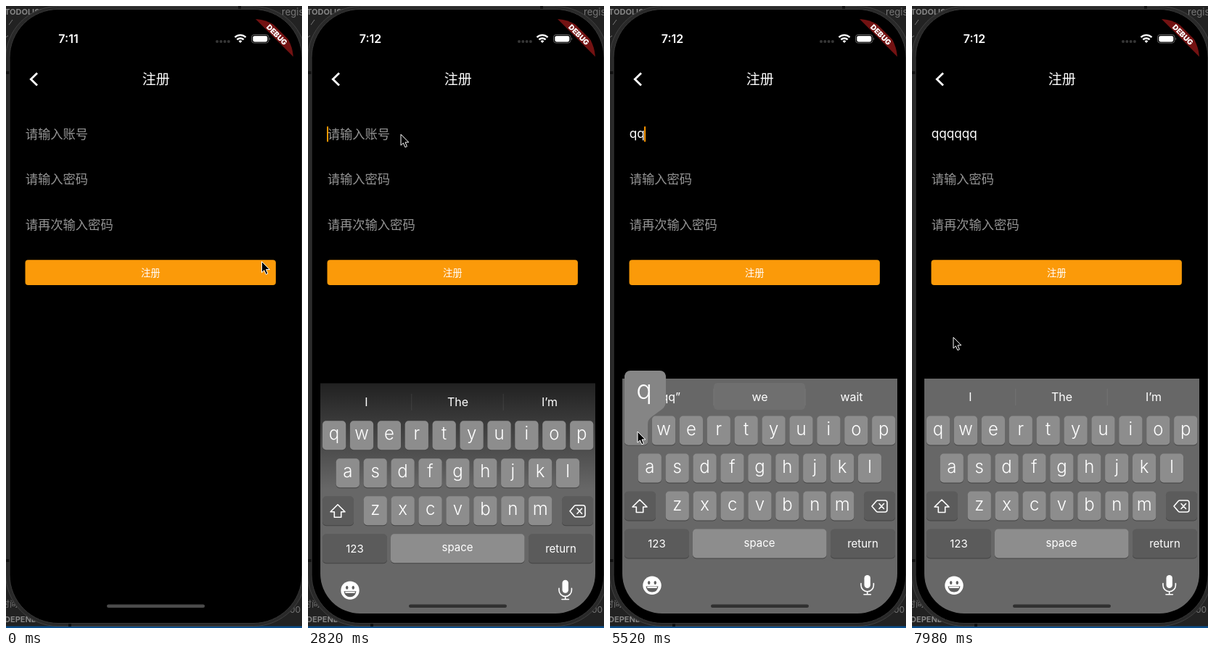
Recreate the animation shown at these times as an HTML page. Size 408x858 px, loop 8 s.

```html
<!DOCTYPE html>
<html lang="zh-CN">
<head>
<meta charset="utf-8">
<title>注册</title>
<style>
html, body { margin: 0; width: 100%; height: 100%; overflow: hidden; background: #222; }
svg { display: block; width: 408px; height: 858px; }
text { font-family: Inter, "Noto Sans CJK SC", "Noto Sans CJK", sans-serif; fill: #fff; white-space: pre; }
.mid { text-anchor: middle; }
.hint { font-size: 17.3px; fill: #939393; }
.ide { fill: #858585; font-size: 11px; font-weight: 700; }
.ide.thin { font-weight: 400; font-size: 13px; fill: #777; }
.letter { font-size: 24px; font-weight: 300; }
.big { font-size: 36px; font-weight: 300; }
.label { font-size: 15px; }
.suggest { font-size: 16px; }
.cap { opacity: var(--fade); }
</style>
</head>
<body>
<svg viewBox="0 0 408 858">
  <defs>
    <clipPath id="screen"><rect x="17" y="18" width="379" height="820" rx="55"/></clipPath>
    <linearGradient id="shade" x1="0" y1="0" x2="0" y2="1">
      <stop id="shadeTop" offset="0"/>
      <stop id="shadeLow" offset=".45"/>
    </linearGradient>
  </defs>

  <rect width="408" height="858" fill="#222"/>
  <text class="ide" x="-2" y="12">TODOLIST</text>
  <text class="ide thin" x="380" y="13">regis</text>
  <path d="M4 26L9 19M0 43l3-2" stroke="#777" fill="none"/>
  <text class="ide thin" x="-6" y="829" style="font-size:11px">时间</text>
  <text class="ide" x="-2" y="850">DEPENDENCIES</text>
  <text class="ide thin" x="391" y="837" style="font-size:12px">00</text>
  <rect y="855.5" width="408" height="2.5" fill="#0b4f8c"/>

  <rect x="-.5" y=".5" width="414" height="855" rx="72" fill="#292929" stroke="#414141"/>
  <path d="M0 92h5M0 765h5M322 0v5M88 851v5" stroke="#111" stroke-width="4"/>
  <rect x="5" y="4.5" width="403" height="847" rx="67" stroke="#383838"/>

  <text id="clock" class="mid" x="86" y="51" font-size="16" font-weight="600"></text>
  <g fill="#363636"><circle cx="291" cy="49" r="2"/><circle cx="296.3" cy="49" r="2"/><circle cx="301.6" cy="49" r="2"/><circle cx="306.9" cy="49" r="2"/></g>
  <g fill="none" stroke="#fff" stroke-width="2.4">
    <path d="M315.5 43.2a10.7 10.7 0 0 1 15 0M318.4 46.4a6.6 6.6 0 0 1 9.2 0"/>
    <path d="M320.6 48.4a3.6 3.6 0 0 1 4.8 0L323 51z" fill="#fff" stroke="none"/>
  </g>
  <rect x="338.5" y="39.5" width="23.5" height="11.5" rx="3.6" fill="none" stroke="#666"/>
  <rect x="340.3" y="41.2" width="20" height="8.2" rx="2.3" fill="#fff"/>
  <path d="M363.3 43.5q2 1.8 0 3.6z" fill="#666"/>
  <g clip-path="url(#screen)">
    <path d="M343 17L397 71V54L360 17z" fill="#731212"/>
    <text class="mid" font-size="10.2" font-weight="900" transform="translate(373.3 39.7) rotate(45)" y="3.6">DEBUG</text>
  </g>

  <path d="M43 92.5L34.3 101l8.7 8.5" fill="none" stroke="#fff" stroke-width="2.8"/>
  <text class="mid" x="206.7" y="108" font-size="19">注册</text>
  <text id="hint" class="hint" x="26.7" y="182.5">请输入账号</text>
  <text id="typed" x="26.7" y="182" font-size="17.2"></text>
  <text class="hint" x="26.7" y="245.3">请输入密码</text>
  <text class="hint" x="26.7" y="307.8">请再次输入密码</text>
  <rect id="caret" y="166" width="2" height="21.5" rx="1" fill="#ff9800"/>
  <rect x="26.5" y="350.2" width="345.4" height="34.8" rx="4" fill="#fb9a09"/>
  <text class="mid" x="199.3" y="373" font-size="13.4">注册</text>

  <g clip-path="url(#screen)">
    <g id="keyboard"></g>
  </g>
  <rect id="home" x="139" y="825.5" width="135" height="4.6" rx="2.3"/>
  <path id="pointer" d="M0 0V15.2L3.4 12 5.9 17.8 8.4 16.7 6 11H10.8z" fill="#000" stroke="#fff"/>
</svg>
<script>
const $ = id => document.getElementById(id);
const LOOP = 8000, STEP = 60;
const FOCUS = 2480, SLIDE = 2531, KEYBOARD_Y = 514, SCREEN_END = 838;
const releases = [5160, 5360, 5560, 5760, 5960, 6160];
// time, x, y
const pointerPath = [
  [0, 352.5, 352.5], [540, 322, 318], [780, 322, 318], [1560, 196, 222],
  [2280, 128, 177], [3240, 128, 177], [3720, 45, 587], [4080, 45, 587],
  [4860, 38, 587], [6200, 38, 587], [6660, 79, 315], [7380, 72, 395], [7980, 57, 457]
];

const clamp = v => Math.min(1, Math.max(0, v));
const ramp = (t, from, to) => clamp((t - from) / (to - from));
const smooth = k => k * k * (3 - 2 * k);
const easeOut = k => 1 - (1 - k) ** 2;

const label = (x, y, text, cls, id = '') =>
  `<text class="mid ${cls}" x="${x}" y="${y}"${id && ` id="${id}"`}>${text}</text>`;

function key(x, y, w, dark) {
  const fill = dark ? '#5b5b5b' : '#8d8d8d';
  return `<g class="cap">
    <rect x="${x}" y="${y + 1}" width="${w}" height="40" rx="5" fill="#434343"/>
    <rect x="${x}" y="${y}" width="${w}" height="40" rx="5" fill="${fill}"/></g>`;
}

function letterRow(letters, left, y) {
  return [...letters].map((ch, i) => {
    const x = left + i * 37.9;
    return key(x, y, 32.2) + label(x + 16.1, y + 26, ch, 'letter', ch === 'q' ? 'keyQ' : '');
  }).join('');
}

function buildKeyboard() {
  const line = 'fill="none" stroke="#fff" stroke-width="1.6" stroke-linejoin="round" stroke-linecap="round"';
  $('keyboard').innerHTML = `
    <rect x="17" width="379" height="324" fill="#676767"/>
    <rect x="17" width="379" height="324" fill="url(#shade)"/>
    <rect id="pick" x="143" y="6" width="126" height="37" rx="5" fill="#6f6f6f"/>
    <path d="M142.8 14v23M269.2 14v23" stroke="#fff" stroke-opacity=".09"/>
    ${[80.5, 206.5, 333].map((x, i) => label(x, 31, '', 'suggest', 'suggest' + i)).join('')}
    ${letterRow('qwertyuiop', 20, 51.5)}
    ${letterRow('asdfghjkl', 38.7, 103.5)}
    ${letterRow('zxcvbnm', 76.7, 155.5)}
    ${key(20, 155.5, 43, true)}${key(350, 155.5, 43, true)}
    <path d="M41 167l10 10h-5.3v7.5h-9.4V177H31z" ${line}/>
    <path d="M361 176l6-7q1-1 2-1h10q3 0 3 3v10q0 3-3 3h-10q-1 0-2-1zM371 172.5l6.5 7M377.5 172.5l-6.5 7" ${line}/>
    ${key(20, 207.5, 89, true)}${key(114, 207.5, 184.5)}${key(304, 207.5, 89, true)}
    ${label(64.5, 233, '123', 'label')}
    ${label(206, 231.5, 'space', 'label')}
    ${label(348.5, 233, 'return', 'label')}
    <circle cx="58" cy="285.3" r="12.7" fill="#fff"/>
    <g fill="#606060">
      <ellipse cx="53.7" cy="281.5" rx="1.7" ry="2.5"/><ellipse cx="62.3" cy="281.5" rx="1.7" ry="2.5"/>
      <path d="M49.5 286.5h17q-1.2 8-8.5 8t-8.5-8z"/>
    </g>
    <path d="M51.3 288h13.4" stroke="#fff" stroke-width="1.8"/>
    <rect x="350.5" y="271" width="8.4" height="18" rx="4.2" fill="#fff"/>
    <path d="M346 282.5v2.5a8.7 8.7 0 0 0 17.4 0v-2.5M354.7 293.7v4M350 297.7h9.4" ${line}/>
    <g id="popup">
      <path d="M20-3a8 8 0 0 1 8-8H69a8 8 0 0 1 8 8V31q0 7-5 11L57 53q-5 4-5 10V86.5a5 5 0 0 1-5 5H25a5 5 0 0 1-5-5z" fill="#858585"/>
      ${label(47, 28, 'q', 'big')}
    </g>`;
}

function pointerAt(t) {
  const i = Math.max(1, pointerPath.findIndex(p => p[0] >= t));
  const [t0, x0, y0] = pointerPath[i - 1], [t1, x1, y1] = pointerPath[i];
  const k = smooth(ramp(t, t0, t1));
  return [x0 + (x1 - x0) * k, y0 + (y1 - y0) * k];
}

function suggestions(t, count) {
  if (t < 2700) return ['', '', ''];
  if (!count || t >= 7020) return ['I', 'The', 'I’m'];
  const typed = `“${'q'.repeat(Math.min(count, 5))}”`;
  return count < 3 ? [typed, 'we', 'wait'] : [typed, '', ''];
}

function caretOpacity(t, count) {
  if (t < FOCUS) return 0;
  const age = t - (count ? releases[count - 1] : FOCUS);
  const phase = age % 1000;
  if (phase >= 500) return 1 - easeOut(clamp((phase - 500) / 250));
  return count && age < 500 ? 1 : easeOut(clamp(phase / 250));
}

function draw(t) {
  const count = releases.filter(r => r <= t).length;
  $('clock').textContent = t < 1200 ? '7:11' : '7:12';
  $('hint').style.opacity = count ? 0 : 1;
  $('typed').textContent = 'q'.repeat(count);
  $('caret').setAttribute('x', 26 + 10.55 * count);
  $('caret').style.opacity = caretOpacity(t, count);

  // critically damped slide
  const s = Math.max(0, t - SLIDE) / 50;
  const y = KEYBOARD_Y + (SCREEN_END - KEYBOARD_Y) * (1 + s) * Math.exp(-s);
  const shown = t >= SLIDE;
  $('keyboard').setAttribute('transform', `translate(0 ${y})`);
  $('keyboard').style.display = shown ? '' : 'none';
  $('keyboard').style.setProperty('--fade', .5 + .5 * ramp(t, SLIDE, 2800));
  $('shadeTop').setAttribute('stop-opacity', .68 * (1 - ramp(t, 2820, 3180)));
  $('shadeLow').setAttribute('stop-opacity', .68 * (1 - ramp(t, 2580, 2810)));
  $('home').setAttribute('fill', shown ? '#303030' : '#4b4b4b');

  suggestions(t, count).forEach((word, i) => $('suggest' + i).textContent = word);
  $('pick').style.opacity = count === 1 || count === 2 ? 1 : 0;
  const pressed = releases.some(r => t >= r - 90 && t < r + 30);
  $('popup').style.display = pressed ? '' : 'none';
  $('keyQ').style.opacity = pressed ? 0 : 1;

  const [px, py] = pointerAt(t);
  $('pointer').setAttribute('transform', `translate(${px} ${py})`);
}

buildKeyboard();
const start = performance.now();
function tick(now) {
  const t = Math.max(0, now - start) % LOOP;
  draw(Math.floor(t / STEP) * STEP);
  requestAnimationFrame(tick);
}
draw(0);
requestAnimationFrame(tick);
</script>
</body>
</html>
```
